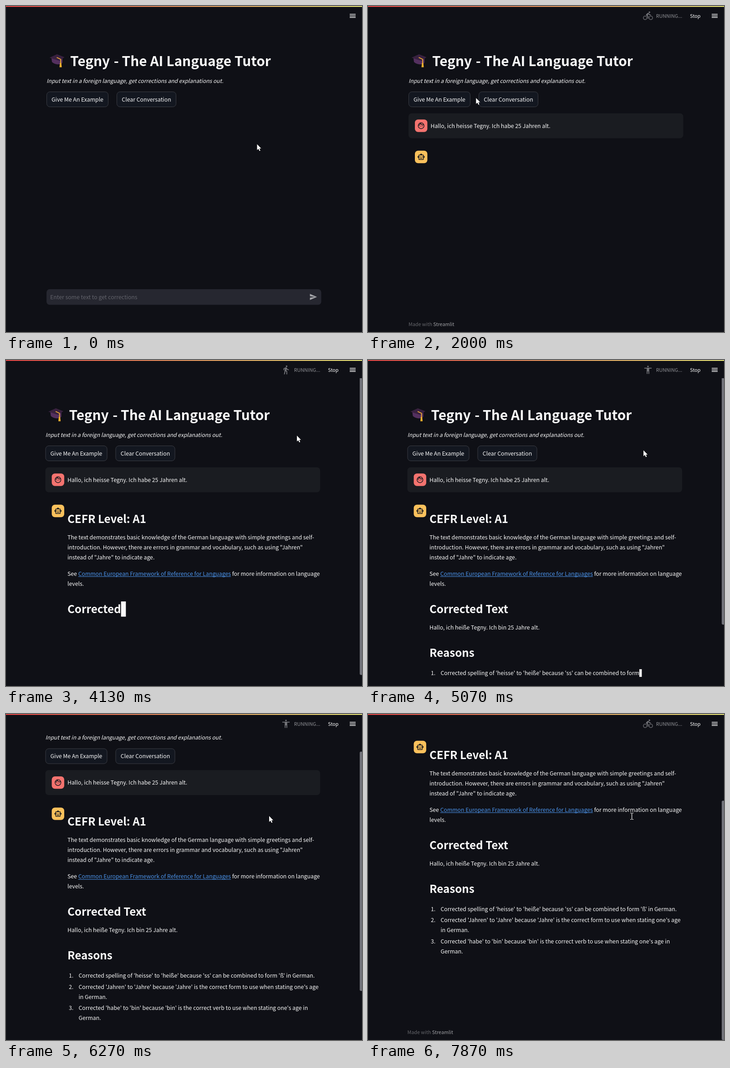
An HTML page with a canvas for the animation above (8000 ms loop, 782x716 px).

```html
<!DOCTYPE html>
<html lang="en">
<head>
<meta charset="utf-8">
<title>AI Language Tutor</title>
<style>
html, body { margin: 0; width: 100%; height: 100%; overflow: hidden; background: #0f1016; }
canvas { display: block; width: 782px; height: 716px; }
</style>
</head>
<body>
<canvas id="stage" width="782" height="716"></canvas>
<script>
const W = 782, H = 716, LOOP = 8000, TICK = 1000 / 15;
const ctx = document.getElementById('stage').getContext('2d');
const FAMILY = '"Noto Sans CJK JP", "Noto Sans CJK SC", "Noto Sans", sans-serif';
const BG = '#0f1016', WHITE = '#fafafa', RED = '#ff4b4b', INK = '#17181d';
const BODY = 12.28, SMALL = 10.75, HEAD = 24.2, TITLE = 29.85;
const NAME = 'Tegny';

const LINK = 'Common European Framework of Reference for Languages';
const line = (y, text, more = {}) => ({ y, text, x: 137.5, size: BODY, weight: 400, ...more });
const heading = (y, text) => line(y, text, { size: HEAD, weight: 600 });
const item = (y, text, mark) => line(y, text, { x: 162, mark });
const REPLY = [
  heading(348, 'CEFR Level: A1'),
  line(389, 'The text demonstrates basic knowledge of the German language with simple greetings and self-'),
  line(411, 'introduction. However, there are errors in grammar and vocabulary, such as using "Jahren"'),
  line(433, 'instead of "Jahre" to indicate age.'),
  line(469, `See ${LINK} for more information on language`),
  line(491, 'levels.'),
  heading(546, 'Corrected Text'),
  line(587, `Hallo, ich heiße ${NAME}. Ich bin 25 Jahre alt.`),
  heading(642, 'Reasons'),
  item(687, "Corrected spelling of 'heisse' to 'heiße' because 'ss' can be combined to form 'ß' in German.", '1.'),
  item(711.5, "Corrected 'Jahren' to 'Jahre' because 'Jahre' is the correct form to use when stating one's age", '2.'),
  item(733.5, 'in German.'),
  item(758, "Corrected 'habe' to 'bin' because 'bin' is the correct verb to use when stating one's age in", '3.'),
  item(780, 'German.')
];

// [time, lines written so far]
const STREAM = [[2440, 0], [2660, 1], [2700, 1], [3060, 2.4], [3330, 4], [3450, 4], [3451, 6],
  [4050, 6], [4140, 7], [4260, 8], [4440, 8], [4530, 9], [4640, 9], [4870, 9.6], [5010, 9.6],
  [5060, 9.85], [5150, 10], [5480, 11], [5530, 12], [5650, 12], [5730, 12.18], [6090, 13], [6130, 14]];

// Rowing, standing, walking, cycling, running, swimming.
const RUN_ICONS = [
  'M8.5 14.5L4 19l1.5 1.5L9 17h2zM17 3a2 2 0 1 0-4 0 2 2 0 1 0 4 0zM21 21l-3 3-3-3v-1.5l-7.1-7.1L7 12.5v-2.2c1.7 0 3.6-.9 4.7-2l1.4-1.6c.4-.4 1-.7 1.7-.7C16 6 17 7 17 8.3V14c0 .8-.4 1.6-.9 2.2l-3.6-3.6v-2.3c-.6.5-1.4 1-2.3 1.4L16.5 18H18z',
  'M12 2a2 2 0 1 1 0 4 2 2 0 1 1 0-4zM21 9h-6v13h-2v-6h-2v6H9V9H3V7h18z',
  'M13.5 5.5a2 2 0 1 0 0-4 2 2 0 1 0 0 4zM9.8 8.9L7 23h2.1l1.8-8 2.1 2v6h2v-7.5l-2.1-2 .6-3C14.8 12 16.8 13 19 13v-2c-1.9 0-3.5-1-4.3-2.4l-1-1.6c-.4-.6-1-1-1.7-1l-.8.1L6 8.3V13h2V9.6z',
  'M15.5 5.5a2 2 0 1 0 0-4 2 2 0 1 0 0 4zM5 12a5 5 0 1 0 0 10 5 5 0 1 0 0-10zM5 13.5a3.5 3.5 0 1 1 0 7 3.5 3.5 0 1 1 0-7zM19 12a5 5 0 1 0 0 10 5 5 0 1 0 0-10zM19 13.5a3.5 3.5 0 1 1 0 7 3.5 3.5 0 1 1 0-7zM10.8 10.5l2.4-2.4.8.8c1.3 1.3 3 2.1 5.1 2.1V9c-1.5 0-2.7-.6-3.6-1.5l-1.9-1.9c-.9-.8-2.3-.8-3 0L7.8 8.4c-.8.8-.8 2 0 2.8L11 14v5h2v-6.2z',
  'M13.5 5.5a2 2 0 1 0 0-4 2 2 0 1 0 0 4zM9.9 19.4l1-4.4 2.1 2v6h2v-7.5l-2.1-2 .6-3c1.3 1.5 3.3 2.5 5.5 2.5v-2c-1.9 0-3.5-1-4.3-2.4l-1-1.6c-.4-.6-1-1-1.7-1l-.8.1L6 8.3V13h2V9.6l1.8-.7-1.6 8.1-4.9-1-.4 2z',
  'M19 5.5a2.5 2.5 0 1 0-5 0 2.5 2.5 0 1 0 5 0zM10 8L6 12l-1.5 1.8 2.5.7 5-1.5 4 1.5 1-.8-6.8-6.8C8.9 5.6 7.5 5 5 5v2.5c1.8 0 2.5.4 3.2 1.1zM2 15.5c2 0 2.5 1 5 1s3-1 5-1 2.5 1 5 1 3-1 5-1v2c-2 0-2.5 1-5 1s-3-1-5-1-2.5 1-5 1-3-1-5-1zM2 19.5c2 0 2.5 1 5 1s3-1 5-1 2.5 1 5 1 3-1 5-1v2c-2 0-2.5 1-5 1s-3-1-5-1-2.5 1-5 1-3-1-5-1z'
].map(d => new Path2D(d));
const ROBOT = new Path2D('M20 9V7a2 2 0 0 0-2-2h-3a3 3 0 0 0-6 0H6a2 2 0 0 0-2 2v2a3 3 0 0 0 0 6v4a2 2 0 0 0 2 2h12a2 2 0 0 0 2-2v-4a3 3 0 0 0 0-6zM6 7h12v12H6zM8 15h8v2H8zM7.5 11.5a1.5 1.5 0 1 0 3 0 1.5 1.5 0 1 0-3 0zM13.5 11.5a1.5 1.5 0 1 0 3 0 1.5 1.5 0 1 0-3 0z');
const FACE = new Path2D('M2 12a10 10 0 1 0 20 0 10 10 0 1 0-20 0zM4 12a8 8 0 1 0 16 0 8 8 0 1 0-16 0zM7.75 13a1.25 1.25 0 1 0 2.5 0 1.25 1.25 0 1 0-2.5 0zM13.75 13a1.25 1.25 0 1 0 2.5 0 1.25 1.25 0 1 0-2.5 0z');
const HAIR = new Path2D('M4 11c3.5-1 5-3.5 6-6.5 2 4 5.5 5.5 10 4.5');
const SEND = new Path2D('M2 21l21-9L2 3v7l15 2-15 2z');
const ARROW = new Path2D('M0 0V13L3 10.3L5.2 15L7.3 14L5.2 9.5H9.2Z');
const HAND = new Path2D('M-1 1c0-1.5 2-1.5 2 0v5l5 1.2c1 .3 1.3 1 1.2 2L6.5 14H0L-4 9c0-1.2 1.3-1.4 3 0z');

const clamp = p => Math.min(1, Math.max(0, p));
const part = (t, a, b) => clamp((t - a) / (b - a));
const smooth = p => p * p * (3 - 2 * p);
const easeOut = p => 1 - (1 - p) ** 2;

function track(keys, t) {
  const i = keys.findIndex(k => k[0] > t);
  if (i < 0) return keys[keys.length - 1][1];
  if (i === 0) return keys[0][1];
  const [t0, a] = keys[i - 1], [t1, b] = keys[i];
  return a + (b - a) * (t - t0) / (t1 - t0);
}

function setFont(size, weight = 400, style = 'normal') {
  ctx.font = `${style} ${weight} ${size}px ${FAMILY}`;
}

// Draws text and returns the x where it ends.
function write(text, x, y, color = WHITE) {
  ctx.fillStyle = color;
  ctx.fillText(text, x, y);
  return x + ctx.measureText(text).width;
}

function box(x, y, w, h, r, fill, stroke) {
  ctx.beginPath();
  ctx.roundRect(x, y, w, h, r);
  if (fill) { ctx.fillStyle = fill; ctx.fill(); }
  if (stroke) { ctx.strokeStyle = stroke; ctx.lineWidth = 1; ctx.stroke(); }
}

// Icons live on a 24-unit grid.
function icon(path, cx, cy, scale, color, outline) {
  ctx.save();
  ctx.translate(cx, cy);
  ctx.scale(scale, scale);
  ctx.translate(-12, -12);
  ctx.fillStyle = ctx.strokeStyle = color;
  ctx.fill(path, 'evenodd');
  ctx.lineWidth = 2;
  if (outline) ctx.stroke(outline);
  ctx.restore();
}

function polygon(color, ...pts) {
  ctx.fillStyle = color;
  ctx.beginPath();
  pts.forEach(([x, y]) => ctx.lineTo(x, y));
  ctx.fill();
}

function drawCap() {
  ctx.fillStyle = '#54305f';
  ctx.beginPath();
  ctx.moveTo(100, 115);
  ctx.lineTo(101, 123);
  ctx.quadraticCurveTo(107, 129, 117, 128);
  ctx.quadraticCurveTo(123, 127, 124, 124);
  ctx.lineTo(124, 115);
  ctx.fill();
  polygon('#38213f', [112, 106], [128.5, 112.5], [117, 120.5], [95.5, 113.5]);
  ctx.strokeStyle = '#f9b233';
  ctx.lineWidth = 1.8;
  ctx.beginPath();
  ctx.moveTo(111.5, 113);
  ctx.lineTo(120, 117);
  ctx.lineTo(120, 127);
  ctx.stroke();
  polygon('#fbb32f', [118.5, 125], [121.5, 125], [122.5, 134.5], [117.5, 134.5]);
}

function mouseAt(t) {
  const moves = [[400, 1070, -371.5, -96.5, smooth], [1810, 2670, 459, -41, smooth], [5000, 5200, -61, 58, easeOut]];
  return moves.reduce(([x, y], [a, b, dx, dy, ease]) => {
    const p = ease(part(t, a, b));
    return [x + dx * p, y + dy * p];
  }, [551.5, 303.5]);
}

const BUTTONS = [{ x: 89.5, w: 135, label: 'Give Me An Example' }, { x: 243.5, w: 130, label: 'Clear Conversation' }];
const isOver = (b, [x, y]) => x > b.x && x < b.x + b.w && y > 188 && y < 221;

function drawButtons(mouse, pressed) {
  setFont(BODY);
  ctx.textAlign = 'center';
  for (const b of BUTTONS) {
    const hover = isOver(b, mouse), active = hover && pressed;
    box(b.x, 188.5, b.w, 33, 7, active ? RED : '#131720', hover ? RED : '#3b3d44');
    write(b.label, b.x + b.w / 2, 209.7, hover && !active ? RED : WHITE);
  }
  ctx.textAlign = 'left';
}

function drawReply(pos) {
  const last = Math.min(Math.ceil(pos), REPLY.length) - 1;
  for (let i = 0; i <= last; i++) {
    const l = REPLY[i], n = Math.floor((pos - i) * l.text.length);
    const base = l.y + (l.size === HEAD ? 9.6 : 4.7);
    const shown = n >= l.text.length ? l.text : l.text.slice(0, Math.max(0, l.text.lastIndexOf(' ', n)));
    setFont(l.size, l.weight);
    if (l.mark) write(l.mark, 140.5, base);
    let end = l.x;
    for (const piece of shown.split(new RegExp(`(${LINK})`))) {
      const from = end, isLink = piece === LINK;
      end = write(piece, from, base, isLink ? '#4b93ea' : WHITE);
      if (isLink) ctx.fillRect(from, base + 1.5, end - from, 1);
    }
    if (i === last && pos < REPLY.length) {
      ctx.fillStyle = WHITE;
      ctx.fillRect(end, l.y - l.size * 0.65, l.size * 0.44, l.size * 1.38);
    }
  }
}

function drawPage(t, mouse, pos) {
  drawCap();
  setFont(TITLE, 700);
  write(NAME, 141, 131.7);
  write('- The AI Language Tutor', 236.7, 131.7);
  setFont(12.07, 400, 'italic');
  write('Input text in a foreign language, get corrections and explanations out.', 89, 168.7);
  drawButtons(mouse, t >= 1320 && t < 1390);
  if (t >= 1520) {
    box(89, 235.7, 603.5, 54.7, 7, '#1a1c21');
    box(103, 249.3, 27.4, 27.4, 7, '#f4736f');
    icon(FACE, 116.7, 263, 0.714, INK, HAIR);
    setFont(BODY);
    write(`Hallo, ich heisse ${NAME}. Ich habe 25 Jahren alt.`, 137.5, 267.7);
  }
  if (t >= 1650) {
    box(103, 317.8, 27.4, 27.4, 7, '#fac15c');
    icon(ROBOT, 116.7, 331.5, 0.714, INK);
  }
  drawReply(pos);
}

function drawInput() {
  box(89, 622, 603.5, 34.3, 7, '#262730');
  setFont(BODY);
  write('Enter some text to get corrections', 97, 643.7, '#62636b');
  icon(SEND, 675, 639, 0.74, '#a3a4a8');
}

function drawHeader(t) {
  ctx.fillStyle = BG;
  ctx.fillRect(0, 0, W, 40);
  const rainbow = ctx.createLinearGradient(0, 0, W, 0);
  rainbow.addColorStop(0, RED);
  rainbow.addColorStop(1, '#fffd80');
  ctx.fillStyle = rainbow;
  ctx.fillRect(0, 0, W, 1.8);
  ctx.fillStyle = WHITE;
  for (const y of [17.5, 21, 24.5]) ctx.fillRect(755, y, 13, 1.5);
  if (t < 1450) return;
  icon(RUN_ICONS[Math.floor((t - 60) / 200) % 6], 615, 21.5, 0.9, '#737479');
  setFont(SMALL);
  write('RUNNING...', 632.7, 25.6, '#909196');
  write('Stop', 707.3, 25.6);
}

function drawMouse(t, [x, y], hover) {
  ctx.save();
  ctx.translate(x, y);
  ctx.fillStyle = '#fff';
  if (t >= 6650) {
    ctx.fillRect(1, -6, 1.2, 13);
    for (const edge of [-7, 7]) {
      ctx.fillRect(-2, edge, 3, 1);
      ctx.fillRect(2.2, edge, 3, 1);
    }
  } else {
    const shape = hover ? HAND : ARROW;
    ctx.strokeStyle = '#000';
    ctx.lineWidth = 1;
    ctx.stroke(shape);
    ctx.fill(shape);
  }
  ctx.restore();
}

function render(time) {
  const t = Math.floor((time + 4) / TICK) * TICK;
  const pos = track(STREAM, t), mouse = mouseAt(t);
  const scroll = [5570, 6170, 7250].reduce((s, a) => s + 259 / 3 * smooth(part(t, a, a + 265)), 0);
  const lastLine = REPLY[Math.min(Math.ceil(pos), REPLY.length) - 1];
  const height = Math.max(H, lastLine ? lastLine.y + 195 : 0);
  const overflows = height > H;

  ctx.fillStyle = BG;
  ctx.fillRect(0, 0, W, H);
  ctx.save();
  ctx.translate(overflows ? -2.5 : 0, -scroll);
  drawPage(t, mouse, pos);
  if (t >= 1590) {
    setFont(SMALL);
    const end = write('Made with ', 89, height - 13.5, '#66676c');
    write('Streamlit', end, height - 13.5, '#a0a1a5');
  } else drawInput();
  ctx.restore();

  if (overflows) box(777, scroll * H / height, 6, H * H / height, 3, '#72737a');
  drawHeader(t);
  drawMouse(t, mouse, BUTTONS.some(b => isOver(b, mouse)));
}

const start = performance.now();
function loop() {
  render((performance.now() - start) % LOOP);
  requestAnimationFrame(loop);
}
loop();
</script>
</body>
</html>
```
